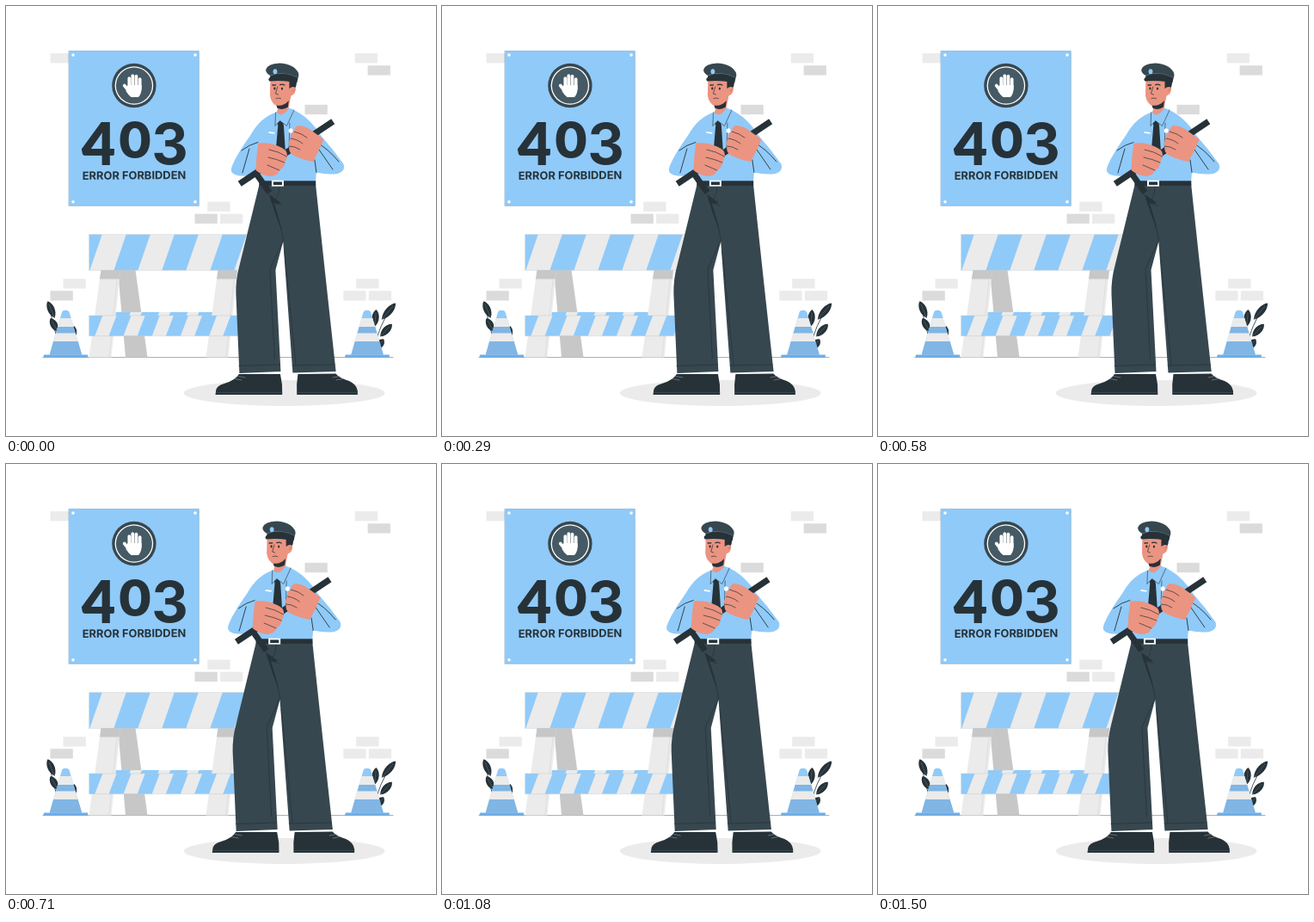
Animation, 500 px wide and 500 px high, one loop 1.54 s. Source, as an HTML page with a canvas:

```html
<!DOCTYPE html>
<html lang="en">
<head>
<meta charset="utf-8">
<title>403 Error Forbidden</title>
<style>
  html, body { margin: 0; width: 100%; height: 100%; overflow: hidden; background: #fff; }
  canvas, svg { position: absolute; left: 0; top: 0; width: 500px; height: 500px; }
  text { font-family: Inter, sans-serif; font-weight: 700; fill: #263238; text-anchor: middle; }
  .digit { font-weight: 800; }
  .four { font-family: Lato, sans-serif; font-weight: 900; }
</style>
</head>
<body>
<canvas id="stage" width="500" height="500"></canvas>
<svg viewBox="0 0 500 500">
  <text class="four" x="107.7" y="185" font-size="68">4</text>
  <text class="digit" x="150" y="175.6" font-size="57">0</text>
  <text x="190.5" y="184.3" font-size="66">3</text>
  <text x="149" y="201.5" font-size="12.9" transform="rotate(-0.4 149 201)">ERROR FORBIDDEN</text>
</svg>
<script>
const ctx = document.getElementById('stage').getContext('2d');
const BLUE = '#90caf9', DEEP = '#80b5e4', DARK = '#263238', SLATE = '#37474f', SKIN = '#eb9481';
const PALE = '#ebebeb', GREY = '#dbdbdb', SHADE = '#c7c7c7', WHITE = '#fff';

function fill(d, color) {
  ctx.fillStyle = color;
  ctx.fill(new Path2D(d));
}

function line(d, color = DARK, width = 0.7, cap = 'round') {
  ctx.strokeStyle = color;
  ctx.lineWidth = width;
  ctx.lineCap = cap;
  ctx.lineJoin = 'round';
  ctx.stroke(new Path2D(d));
}

function rect(x, y, w, h, color) {
  ctx.fillStyle = color;
  ctx.fillRect(x, y, w, h);
}

function oval(x, y, rx, ry, color) {
  ctx.fillStyle = color;
  ctx.beginPath();
  ctx.ellipse(x, y, rx, ry, 0, 0, Math.PI * 2);
  ctx.fill();
}

function drawBricks() {
  const brick = (x, y, color = PALE) => rect(x, y, 26.3, 11.3, color);
  brick(51.5, 55);
  brick(405.7, 55);
  brick(420.6, 69.2, GREY);
  brick(347.5, 114.8, GREY);
  brick(234.2, 227.6);
  brick(219.5, 241.7, GREY);
  brick(249, 241.7);
  brick(66.5, 317.2);
  brick(51.5, 331.2, GREY);
  brick(407.2, 317.2);
  brick(392.3, 331.2);
  brick(421.8, 331.2);
}

function drawSign() {
  rect(73.3, 52.3, 151, 180, BLUE);
  ctx.strokeStyle = '#6a94b8';
  ctx.lineWidth = 0.5;
  ctx.strokeRect(73.3, 52.3, 151, 180);
  for (const x of [78, 220]) for (const y of [57, 227.7]) oval(x, y, 1.8, 1.8, WHITE);

  oval(148.9, 92.5, 25.7, 25.7, SLATE);
  oval(148.9, 92.5, 22.3, 22.3, WHITE);
  oval(148.9, 92.5, 21, 21, '#455a64');
  line('M143.3 84V96M147.3 81V96M151.5 81.5V96M155.7 85V96', WHITE, 3.7);
  line('M137.7 92.5L143 99', WHITE, 3.7);
  fill('M141.4 92H157.6V97Q157 103 154 106H145.5Q142.5 104 139.5 99Z', WHITE);
}

function board(x, y, w, h, first, period, stripe, shear) {
  ctx.save();
  ctx.beginPath();
  ctx.rect(x, y, w, h);
  ctx.clip();
  rect(x, y, w, h, PALE);
  for (let left = first; left < x + w + shear; left += period) {
    fill(`M${left} ${y}h${stripe}l${-shear} ${h}h${-stripe}z`, BLUE);
  }
  ctx.restore();
}

function outline(x, y, w, h) {
  ctx.strokeStyle = '#b9c3ca';
  ctx.lineWidth = 0.4;
  ctx.strokeRect(x, y, w, h);
}

function drawBarricade() {
  fill('M130 307H150.5L164.5 408.5H139Z', SHADE);
  board(127, 355.8, 116, 4.6, 125, 33.2, 20, 2);
  for (const x of [0, 136]) {
    fill(`M${110.5 + x} 307H${133 + x}L${122.5 + x} 408.5H${96.5 + x}Z`, PALE);
    fill(`M${110.5 + x} 307H${133 + x}L${132 + x} 317.5H${109 + x}Z`, SHADE);
    line(`M${129 + x} 318L${120 + x} 408`, '#d5d5d5', 0.6);
  }
  board(96.8, 265.6, 188, 41.8, 83.8, 56, 28, 14.5);
  outline(96.8, 265.6, 188, 41.8);
  board(96.8, 360, 180, 23.7, 95.3, 33.2, 17, 9);
  outline(96.8, 360, 180, 23.7);
}

function leaf(x, y, length, turn) {
  ctx.save();
  ctx.translate(x, y);
  ctx.rotate(turn);
  fill(`M0 ${length}C-6 ${length * 0.4} -5 ${-length * 0.6} 0 ${-length}C5 ${-length * 0.6} 6 ${length * 0.4} 0 ${length}`, DARK);
  line(`M0 ${-length * 0.6}V${length}`, '#60727b', 0.5);
  ctx.restore();
}

function drawPlants() {
  line('M51 348Q54 378 66 400M79 374Q80 388 75 400', DARK, 0.8);
  leaf(52.5, 353, 10.5, -0.4);
  leaf(56, 371, 9, -0.5);
  leaf(78, 380, 8, 0.15);
  line('M429 356Q429 384 423 402M450 347Q434 370 426 404', DARK, 0.8);
  leaf(429.5, 363, 10, 0.1);
  leaf(445, 355, 12.5, 0.7);
  leaf(442, 377, 10, 0.75);
  leaf(435, 393, 7, 0.65);
}

function cone(x) {
  ctx.save();
  ctx.translate(x, 0);
  const body = 'M-4.5 357Q-4 353.8 0 353.8Q4 353.8 4.7 357L19 405.5H-18.5Z';
  fill(body, BLUE);
  ctx.clip(new Path2D(body));
  rect(-25, 363, 50, 10, PALE);
  rect(-25, 373, 50, 7.5, DEEP);
  rect(-25, 380.5, 50, 9.5, PALE);
  rect(-25, 390, 50, 16, DEEP);
  ctx.restore();
  fill(`M${x - 25} 405.6H${x + 26}V409H${x - 26}Z`, '#70aee5');
}

function drawScene() {
  rect(0, 0, 500, 500, WHITE);
  drawBricks();
  drawSign();
  line('M43 408.6H450', '#687177', 0.6);
  drawBarricade();
  drawPlants();
  cone(69.2);
  cone(419.8);
  oval(323.7, 450, 116.8, 15, PALE);
}

function drawLegs() {
  fill('M243.6 452L244.4 446Q246 441 254 439Q267 435 271 428L319 428Q322 440 321.3 452Z', DARK);
  fill('M338.3 452Q337.5 440 339.5 428L383.5 427.5Q388 433 399 436Q408 440 409 448V452Z', DARK);
  line('M244.5 449.5H321M338.5 449.5H408.5', '#4b5a61', 0.5);
  line('M266 433.5L274 435M270 430.5L278 432M380 432L388 430.5M384 435L392 433.5', '#8b989e', 0.6);

  fill('M295 206H360Q370.5 305 383.7 425L333.5 426.5L322.3 274L313.5 307L319.5 425L271.5 427L267.5 335Q267 318 271.5 302Z', SLATE);
  line('M271 418.5L318.5 417M333 418L382.5 417M308 225Q317 242 322.5 272L307 306L312.5 410M324 285L337 417M318 209Q318 222 311 229L321 232');
  fill('M306 219L320 229Q313 231 311 227Q318 248 321 263Q313 242 306 219Z', DARK);
}

function drawTorso() {
  fill('M314 123.5C301 128 292 137 284.5 150C273 166 264 181 261.8 190Q261.5 196 272 197.5L293 198L295.5 205H360L361 193.5Q374 196.5 386 195Q395 192 392.7 184Q380 166 366.5 151Q353 129 333 120Z', BLUE);
  line('M293 158.5Q283 161 274 168M283 166L275 194M360 158Q375 166 387 181M362 164L380 190M361 193.5L359 179', DARK, 0.9);
  rect(294.5, 203.3, 65.8, 5.6, DARK);
  rect(309, 202.7, 14, 7, WHITE);
  rect(311, 204.4, 10, 3.7, DARK);
  fill('M315.3 133.5L321.5 133L323 139L325 170L314 166L316.3 139Z', DARK);
  fill('M313.6 123.5L313 139.5L318.7 133.5L326.5 139.5L335 121L328 118Z', BLUE);
  line('M313.6 124L313 139.5L318.7 133.5L326.5 139.5L335 121M329 170L330 136', DARK, 0.6);
  line('M305.5 146.8L312.5 147.8', WHITE, 1.8, 'butt');
  oval(331.2, 145, 2.5, 2.8, WHITE);
}

function drawArms() {
  line('M271.8 206.8L380.3 134.3', DARK, 7.2, 'butt');
  line('M289 192L306.5 217', DARK, 7, 'butt');
  fill('M293.5 159.5Q307 158 318 163.5Q327 167 327 173Q327 178 324.5 181Q324 188 318 191Q316 198 307 198Q298 197 290.5 191Q291 174 293.5 159.5Z', SKIN);
  line('M306 167Q317 169 326.5 175M305 176Q315 178 324 182M304 185Q311 188 318 191', DARK, 0.7);
  fill('M339 139Q349 139 357 146L369.5 155Q364 169 357 181Q345 179 334 173.5Q328 170 329.5 163Q327.5 159 331 154Q330 148 335 146Q335 142 339 139Z', SKIN);
  line('M335 146Q344 148 350 153M331 154Q339 155 345 160M329.8 163Q336 163 342 167', DARK, 0.7);
}

function drawHead() {
  fill('M328 85H338Q339 93 333.5 101L329 99Z', DARK);
  fill('M307.5 83H329.5V96Q333.5 92.5 336.8 95Q337.8 102 331.5 104.5L328.5 119.5Q321 130 315 124L316.5 117Q308.5 114 307 104Z', SKIN);
  fill('M314.5 115.5Q323 117 328.8 110L328 117.5Q322 121.5 315.5 118.8Z', DARK);
  oval(312.4, 95.8, 1.1, 1.6, DARK);
  oval(321, 96, 1.1, 1.6, DARK);
  line('M310 92L313.7 91.8M318.7 91.7Q321.5 90.6 324 92', DARK, 1.3);
  line('M315.8 94L313.5 102L316.5 103M314 107.5Q317 106.5 319.5 107.5', DARK, 0.7);
  line('M333.5 99L335.8 96.5', '#a95f52', 0.6);

  fill('M302.2 74Q304 67 318 66.4Q335 67 340.2 78Q341 81 339.5 84Q322 75 307.5 81Q302 78 302.2 74Z', SLATE);
  fill('M307.3 81Q322 74.5 339.6 83.5L338.5 89L330.5 88Q318 82.5 307 85Z', DARK);
  line('M307.3 80.8Q322 74.5 339.6 83.3', '#65757e', 0.5);
  fill('M307 83Q318 81 331 88Q318 86.5 306.5 87.5Q304 85 307 83Z', DARK);
  oval(313, 76.2, 2.4, 2.9, BLUE);
}

// CSS-style "ease", cubic-bezier(.25, .1, .25, 1)
function ease(x) {
  let lo = 0, hi = 1, u = x;
  for (let i = 0; i < 18; i++) {
    u = (lo + hi) / 2;
    const bx = 0.75 * u * (1 - u) + u ** 3;
    if (bx < x) lo = u; else hi = u;
  }
  return 0.3 * u * (1 - u) ** 2 + 3 * u * u * (1 - u) + u ** 3;
}

const LOOP = 1540, STEPS = 37, PHASE = 0.009;
const SHAKE = [0, -1, 2, -4, 4, -4, 4, -4, 2, -1, 0];

function shakeAt(time) {
  const step = Math.floor(time / LOOP * STEPS + 0.08) % STEPS;
  const pos = (step / (STEPS - 1) + PHASE) % 1 * 10;
  const i = Math.floor(pos);
  return SHAKE[i] + (SHAKE[i + 1] - SHAKE[i]) * ease(pos - i);
}

const start = performance.now();

function frame() {
  const time = (performance.now() - start) % LOOP;
  drawScene();
  ctx.save();
  ctx.translate(shakeAt(time), 0);
  drawLegs();
  drawTorso();
  drawArms();
  drawHead();
  ctx.restore();
  requestAnimationFrame(frame);
}
frame();
</script>
</body>
</html>
```
